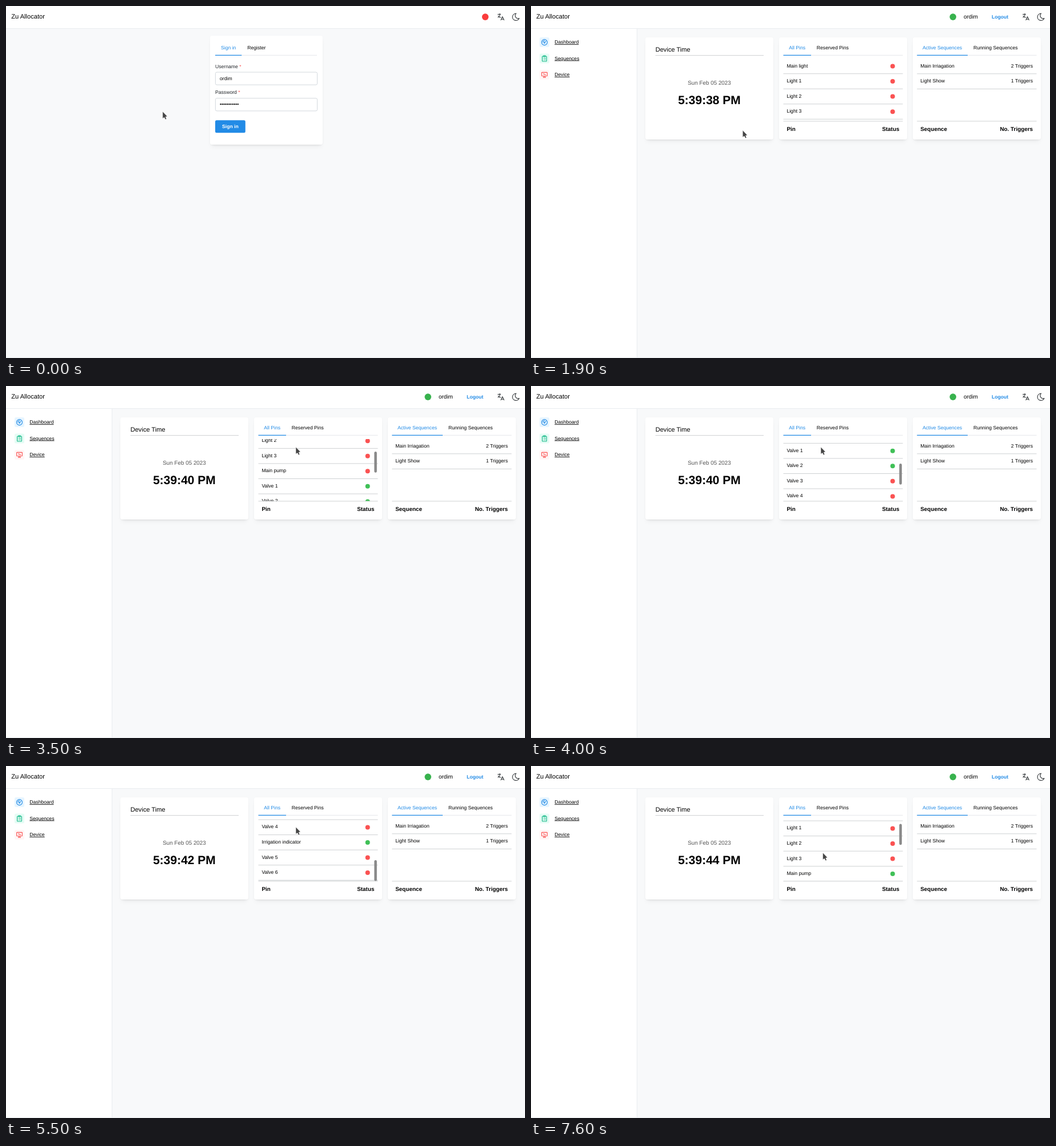
Animation, 908 px wide and 617 px high, one loop 8000 ms. Source, as an HTML page:

```html
<!DOCTYPE html>
<html lang="en">
<head>
<meta charset="utf-8">
<title>Scheduler dashboard</title>
<style>
  html, body { margin: 0; width: 100%; height: 100%; overflow: hidden; background: #f8f9fa; }
  #stage { position: relative; width: 908px; height: 617px; overflow: hidden; }
  #stage > svg { position: absolute; left: 0; top: 0; }
  .bar, .nav, .foot { position: absolute; left: 0; background: #fff; }
  .bar { top: 0; width: 908px; height: 39px; border-bottom: 1px solid #e9ecef; }
  .nav { top: 40px; width: 185px; height: 576px; border-right: 1px solid #e9ecef; }
  .foot { top: 615.5px; width: 908px; height: 2px; border-top: 1px solid #e9ecef; }
  .card {
    position: absolute; top: 55px; width: 224px; height: 178.5px; border-radius: 3px; background: #fff;
    box-shadow: 0 .6px 2px rgba(0,0,0,.06), 0 6px 9px -3px rgba(0,0,0,.06), 0 4px 4px -3px rgba(0,0,0,.05);
  }
  text { font: 8.64px "Liberation Sans", Arial, sans-serif; text-rendering: geometricPrecision; }
  .md { font-size: 9.87px; }
  .lg { font-size: 11.1px; }
  .xl { font-size: 20.98px; }
  .b { font-weight: 700; }
  .blue { fill: #228be6; }
  .mid { text-anchor: middle; }
  .end { text-anchor: end; }
  .line { stroke: #c9cccf; stroke-width: .9; }
  .rule { stroke: #e4e7ea; stroke-width: 1; }
  .on { stroke: #228be6; stroke-width: 1.2; }
  .field { fill: #fff; stroke: #ced4da; stroke-width: .9; }
  .icon { fill: none; stroke-linecap: round; stroke-linejoin: round; }
  .link { text-decoration: underline; text-decoration-thickness: .8px; text-underline-offset: 1.2px; }
</style>
</head>
<body>
<div id="stage">
  <div class="bar"></div>
  <div id="loginBack"><div class="card" style="left:357px;top:52px;width:197px;height:190.5px"></div></div>
  <div id="homeBack">
    <div class="nav"></div>
    <div class="card" style="left:200px"></div>
    <div class="card" style="left:434px"></div>
    <div class="card" style="left:668px"></div>
  </div>
  <div class="foot"></div>

  <svg width="908" height="617" viewBox="0 0 908 617">
    <defs>
      <clipPath id="view"><rect x="441" y="93" width="210" height="109"/></clipPath>
    </defs>

    <text class="lg" x="9.3" y="22">Zu Allocator</text>
    <circle id="status" cy="19.1" r="5.8"/>
    <g class="icon" stroke="#3c4043" stroke-width="1.8">
      <path transform="translate(858 11.4) scale(.66)" d="M4 5h7M9 3v2c0 4.4-2.2 8-5 8M5 9c0 2.1 3 3.9 6.7 4M12 20l4-9l4 9M19.1 18h-6.2"/>
      <path transform="translate(884.1 11.1) scale(.68)" d="M12 3h.4a7.5 7.5 0 0 0 7.9 12.4a9 9 0 1 1-8.3-12.4z"/>
    </g>

    <g id="login">
      <path class="rule" d="M366 86.3H544"/>
      <path class="on" d="M366 86.3H412.3"/>
      <text class="blue" x="376" y="76">Sign in</text>
      <text x="422.2" y="76">Register</text>
      <text x="366" y="108.6" fill="#212529">Username <tspan fill="#fa5252">*</tspan></text>
      <rect class="field" x="366.4" y="116" width="178.2" height="22.2" rx="2.5"/>
      <text x="374" y="129.6">ordim</text>
      <text x="366" y="154.3" fill="#212529">Password <tspan fill="#fa5252">*</tspan></text>
      <rect class="field" x="366.4" y="161.7" width="178.2" height="22.2" rx="2.5"/>
      <text x="374" y="175.3">•••••••••••</text>
      <g id="button">
        <rect x="366" y="200.2" width="52.8" height="22" rx="2.5"/>
        <text class="b mid" x="392.4" y="213.6" fill="#fff">Sign in</text>
      </g>
    </g>

    <g id="home">
      <text class="md" x="757" y="22.3">ordim</text>
      <text class="b blue" x="806" y="21.5">Logout</text>

      <g class="icon" stroke-width="1.1">
        <rect x="15" y="55" width="17" height="17" rx="2.5" fill="#e7f5ff"/>
        <path stroke="#228be6" d="M18.5 63.6a5 5 0 1 0 10 0a5 5 0 1 0-10 0M22.7 64.4a.9.9 0 1 0 1.8 0a.9.9 0 1 0-1.8 0M24.3 63.5l1.7-1.9M20.8 63.6a2.7 2.7 0 0 1 2.7-2.7"/>
        <rect x="15" y="83.5" width="17" height="17" rx="2.5" fill="#e6fcf5"/>
        <path stroke="#12b886" d="M21.8 88H20.6a1 1 0 0 0-1 1V96a1 1 0 0 0 1 1H26.4a1 1 0 0 0 1-1V89a1 1 0 0 0-1-1H25.2M21.9 87.1H25.1V88.9H21.9zM21.8 91.6h.1M23.7 91.6h1.6M21.8 94.2h.1M23.7 94.2h1.6"/>
        <rect x="15" y="112" width="17" height="17" rx="2.5" fill="#fff5f5"/>
        <path stroke="#fa5252" d="M19.4 116.4H27.6a.8.8 0 0 1 .8.8V122a.8.8 0 0 1-.8.8H19.4a.8.8 0 0 1-.8-.8V117.2a.8.8 0 0 1 .8-.8zM21.3 125.3H25.7M22.4 122.8v2.5M24.6 122.8v2.5M21.5 118.7l1.2 1l1.2-.5M24.5 120.3h1.2"/>
      </g>
      <text class="link" x="41.3" y="66">Dashboard</text>
      <g id="links">
        <text class="link" x="41.3" y="94.5">Sequences</text>
        <text class="link" x="41.3" y="123.2">Device</text>
      </g>

      <text class="lg" x="217.7" y="80.4">Device Time</text>
      <path class="line" d="M217.7 86.6H407"/>
      <g id="clock">
        <text class="md mid" x="312" y="137.7" fill="#555">Sun Feb 05 2023</text>
        <text class="xl b" id="time" x="257.2" y="171.7"></text>
      </g>
      <g id="loader">
        <rect x="200" y="55" width="224" height="178.5" rx="3" fill="#fff" fill-opacity=".75"/>
        <g id="spinner" fill="none" stroke="#228be6" stroke-width="2.7">
          <circle cx="312" cy="143.8" r="9.4" stroke-opacity=".5"/>
          <path d="M312 134.4a9.4 9.4 0 0 1 9.4 9.4"/>
        </g>
      </g>

      <path class="rule" d="M441.5 86.3H650.5M675.3 86.3H884.5"/>
      <path class="on" d="M441.5 86.3H490M675.3 86.3H764"/>
      <text class="blue" x="451.3" y="76">All Pins</text>
      <text x="499.8" y="76">Reserved Pins</text>
      <text class="blue" x="685" y="76">Active Sequences</text>
      <text x="774" y="76">Running Sequences</text>

      <g id="empty">
        <text class="md mid" x="545.8" y="138.4">No pins defined</text>
        <text class="b blue mid" x="545.8" y="156.6">Add new pin</text>
        <text class="md mid" x="779.6" y="149.6">No active sequences</text>
      </g>
      <g id="data">
        <g clip-path="url(#view)">
          <g id="pins"></g>
          <rect id="thumb" x="644.3" width="4.5" height="36.7" rx="2.2" fill="#898989"/>
        </g>
        <text x="681.3" y="107.6">Main Irriagation</text>
        <text class="end" x="878" y="107.6">2 Triggers</text>
        <text x="681.3" y="134.4">Light Show</text>
        <text class="end" x="878" y="134.4">1 Triggers</text>
        <path class="line" d="M675.3 118.8H884.5M675.3 145.4H884.5"/>
      </g>

      <path class="line" d="M441.5 201.9H650.5M675.3 201.9H884.5"/>
      <text class="md b" x="447.4" y="219">Pin</text>
      <text class="md b end" x="644.4" y="219">Status</text>
      <text class="md b" x="681.3" y="219">Sequence</text>
      <text class="md b end" x="878" y="219">No. Triggers</text>
    </g>

    <g id="cursor">
      <path id="arrow" d="M0 0V12.2L2.8 10.2L4.9 14L6.8 13L5.2 9.3L8.2 8.6z" fill="#454545" stroke="#fff" stroke-width=".5"/>
      <path id="beam" d="M-2.3-6H-.6L0-5.4L.6-6H2.3M0-5.4V5.4M-2.3 6H-.6L0 5.4L.6 6H2.3" fill="none" stroke="#444" stroke-width=".9"/>
      <path id="hand" d="M-1 0a1 1 0 0 1 2 0V4.5L5.5 5.8Q6.6 6.2 6.4 7.5L5.6 12H-.2L-3.8 7.7Q-3.6 6.3-1 8z" fill="#454545" stroke="#fff" stroke-width=".5"/>
    </g>
  </svg>
</div>

<script>
const LOOP = 8000, STEP = 100, PITCH = 26.55;
const RED = '#fa5252', GREEN = '#40c057';
const $ = id => document.getElementById(id);
const show = (id, on) => { $(id).style.display = on ? '' : 'none'; };

const pinNames = ['Main light', 'Light 1', 'Light 2', 'Light 3', 'Main pump', 'Valve 1', 'Valve 2',
  'Valve 3', 'Valve 4', 'Irrigation indicator', 'Valve 5', 'Valve 6'];
const active = new Set(['Valve 1', 'Valve 2', 'Irrigation indicator']);

$('pins').innerHTML = pinNames.map((name, i) => `<g transform="translate(0 ${i * PITCH})">
  <text x="447.4" y="107.5">${name}</text>
  <circle cx="632.7" cy="105.5" r="4" fill="${active.has(name) ? GREEN : RED}"/>
  <path class="line" d="M441.5 118.7H650.5"/></g>`).join('');
const pumpDot = $('pins').children[4].querySelector('circle');

// Each key is [time, ...values].
const pointer = [
  [300, 274, 185], [500, 305, 175], [700, 355, 168], [800, 372, 169], [900, 384, 180],
  [1000, 392, 203], [1100, 396, 215], [1400, 396, 215], [2100, 360, 219], [2300, 325, 207],
  [2400, 316, 195], [2500, 324, 184], [2600, 341.6, 175], [2700, 485, 103], [2800, 485, 103],
  [3100, 507, 107], [6000, 507, 107], [6600, 507, 138.5], [7100, 507, 138.5], [7400, 510.5, 152]
];
const scroll = [
  [3300, 0], [3500, 62.4], [3800, 62.4], [4000, 124.5], [4500, 124.5], [4700, 186.8],
  [4900, 186.8], [5200, 210.5], [6500, 210.5], [6800, 147.2], [7200, 147.2], [7600, 22.6]
];

function sample(keys, t) {
  const i = keys.findIndex(k => k[0] > t);
  if (i < 0) return keys[keys.length - 1].slice(1);
  if (i === 0) return keys[0].slice(1);
  const a = keys[i - 1], b = keys[i], p = (t - a[0]) / (b[0] - a[0]);
  return a.slice(1).map((v, n) => v + (b[n + 1] - v) * p);
}

function draw(t) {
  const home = t >= 1300, loaded = t >= 1600;
  for (const id of ['login', 'loginBack']) show(id, !home);
  for (const id of ['home', 'homeBack']) show(id, home);

  $('status').setAttribute('cx', home ? 738.2 : 838.5);
  $('status').setAttribute('fill', loaded ? '#37b24d' : '#fa3c3c');
  $('links').style.textDecorationColor = '';
  for (const link of $('links').children) link.style.textDecorationColor = loaded ? '#551a8b' : '#2a2aee';

  show('empty', !loaded);
  show('data', loaded);
  show('clock', loaded);
  $('loader').style.opacity = Math.max(0, Math.min(1, (1900 - t) / 300));
  $('spinner').setAttribute('transform', `rotate(${(t - 1300) * .36 + 12} 312 143.8)`);
  const second = 38 + [2400, 3400, 4500, 5500, 6500, 7500].filter(at => t >= at).length;
  $('time').textContent = `5:39:${second} PM`;

  const [y] = sample(scroll, t);
  $('pins').setAttribute('transform', `translate(0 ${-y})`);
  $('thumb').setAttribute('y', 93.9 + y * .338);
  show('thumb', t >= 2700);
  pumpDot.setAttribute('fill', t >= 5500 ? GREEN : RED);

  const [cx, cy] = sample(pointer, t);
  const hand = t >= 1000 && !home;
  const beam = t === 800 || t === 900 || t === 2600;
  $('cursor').setAttribute('transform', `translate(${cx} ${cy})`);
  show('hand', hand);
  show('beam', beam);
  show('arrow', !hand && !beam);
  $('button').setAttribute('fill', hand ? '#1c7ed6' : '#228be6');
  $('button').setAttribute('transform', `translate(0 ${t === 1200 ? .6 : 0})`);
}

const start = performance.now();
function tick() {
  const t = (performance.now() - start) % LOOP;
  draw(Math.floor(t / STEP) * STEP);
  requestAnimationFrame(tick);
}
tick();
</script>
</body>
</html>
```
